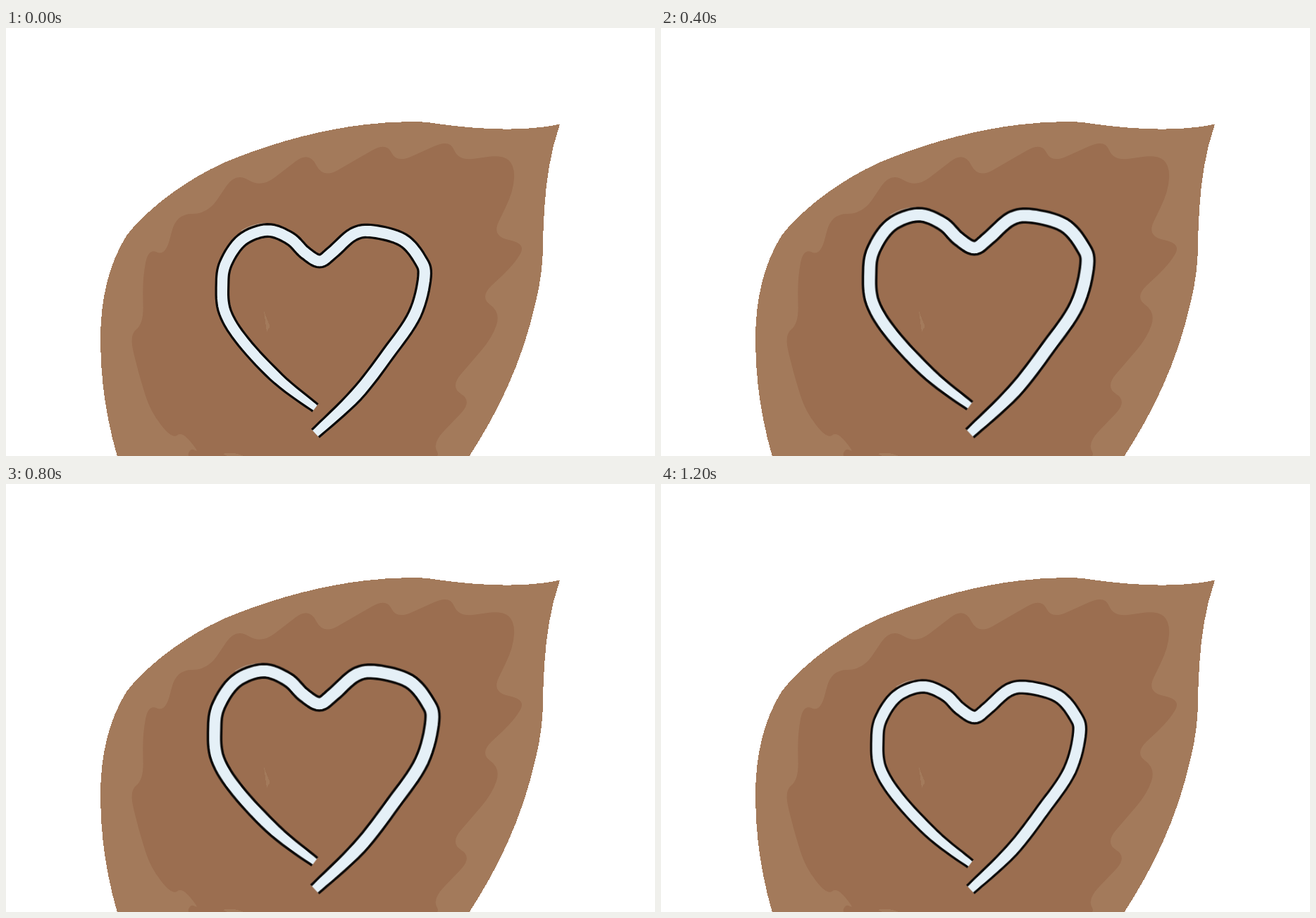
An HTML page that plays this animation: 921 by 608 pixels, repeating every 2200 ms.

```html
<!DOCTYPE html>
<html lang="en">
<head>
<meta charset="utf-8">
<title>Heart on a leaf</title>
<style>
  html, body { margin: 0; width: 100%; height: 100%; overflow: hidden; background: #fff; }
  svg { display: block; width: 100%; height: 100%; }
  .rim { fill: #a37a5b; shape-rendering: crispEdges; }
  #blade { fill: #9b6e50; }
  #heart { transform-origin: 450px 579px; animation: beat 2200ms step-end infinite; }
  #band { fill: #e5f0f7; }
  #ink { fill: none; stroke: #0b0908; stroke-width: 3.2; stroke-linejoin: round; }
  .sheen { fill: none; stroke: #b5a08f; stroke-width: 1.2; }

  /* two beats of six 100 ms steps, then a rest */
  @keyframes beat {
    0%, 27.272%, 54.545%, 100% { transform: scale(1); }
    4.545%, 22.727%, 31.818%, 50% { transform: scale(1.035); }
    9.09%, 18.181%, 36.363%, 45.454% { transform: scale(1.076); }
    13.636%, 40.909% { transform: scale(1.124); }
  }
</style>
</head>
<body>
<svg viewBox="0 0 921 608" preserveAspectRatio="none">
  <path class="rim" d="M158 609C141 550 134 495 134 443C134 385 146 335 171 295C198 259 262 208 330 183C405 154 490 133.5 575 133C590 133 600 134 612 136C670 144 735 148 786 136.5C766 195 764 250 762 300C763 330 758 365 752 388C735 465 705 535 657 609Z"/>
  <path id="blade"/>
  <path class="rim" d="M366 402C369 412 375 421 374 426C372 427 371 429 370 432Z"/>
  <path class="rim" d="M308 605Q323 601 339 609H316Z"/>
  <g id="heart">
    <path class="sheen" d="M334 288Q350 278 368 277.5"/>
    <path id="band"/>
    <path id="ink"/>
  </g>
</svg>
<script>
  // Corners of the ragged inner leaf, clockwise from the lower left.
  const corners = [
    [256, 612], [262, 596], [275, 604], [250, 573], [236, 584], [205, 545], [188, 490],
    [175, 436], [195, 420], [194, 355], [202, 313], [226, 324], [242, 264], [286, 264],
    [326, 205], [362, 227], [430, 175], [450, 214], [540, 162], [554, 192], [630, 158],
    [642, 189], [704, 180], [722, 195], [720, 232], [689, 296], [738, 306], [722, 335],
    [672, 382], [702, 404], [690, 440], [630, 510], [662, 530], [605, 590], [618, 612]
  ];

  // Middle of the brush stroke, from the left end to the right end.
  const stroke = [
    [439, 539.5], [387, 499], [337, 446], [311, 404], [307, 365], [312, 334], [335, 301],
    [371, 287.5], [403, 299], [424, 319], [445, 331], [463, 319], [493, 293], [521, 289],
    [563, 301], [587, 328], [594, 353], [580, 407], [542, 463], [497, 521], [439, 576]
  ];

  const mix = (a, b, t) => a.map((v, i) => v + (b[i] - v) * t);
  const gap = (a, b) => Math.hypot(b[0] - a[0], b[1] - a[1]);
  const line = points => "M" + points.map(p => p.map(v => v.toFixed(1))).join("L");
  const draw = (id, d) => document.getElementById(id).setAttribute("d", d);

  function roundedPolygon(points, radius) {
    const toward = (a, b) => mix(a, b, Math.min(0.5, radius / gap(a, b)));
    const n = points.length;
    return "M" + points.map((p, i) => {
      const before = points[(i + n - 1) % n], after = points[(i + 1) % n];
      return `${toward(p, before)}Q${p} ${toward(p, after)}`;
    }).join("L") + "Z";
  }

  // Catmull-Rom curve, sampled evenly between the points.
  function smooth(points, steps) {
    const last = points.length - 1;
    return Array.from({ length: last * steps + 1 }, (_, k) => {
      const i = Math.min(Math.floor(k / steps), last - 1), t = k / steps - i;
      const [a, b, c, d] = [i - 1, i, i + 1, i + 2]
        .map(j => points[Math.max(0, Math.min(last, j))]);
      return b.map((v, x) => v + t / 2 * (c[x] - a[x]
        + t * (2 * a[x] - 5 * v + 4 * c[x] - d[x]
        + t * (3 * (v - c[x]) + d[x] - a[x]))));
    });
  }

  // Brush width along the stroke: narrower at both ends.
  const width = u => 18 * Math.min(0.96 + 0.08 * u, 0.67 + 5 * u, 0.8 + 5 * (1 - u));

  function edge(points, side) {
    return points.map((p, i) => {
      const a = points[Math.max(0, i - 1)], b = points[Math.min(points.length - 1, i + 1)];
      const k = side * width(i / (points.length - 1)) / 2 / gap(a, b);
      return [p[0] - (b[1] - a[1]) * k, p[1] + (b[0] - a[0]) * k];
    });
  }

  const middle = smooth(stroke, 8);
  const outer = edge(middle, -1), inner = edge(middle, 1);

  draw("blade", roundedPolygon(corners, 24));
  draw("band", line([...outer, ...inner.reverse()]) + "Z");
  draw("ink", line(outer) + line(inner));
</script>
</body>
</html>
```
